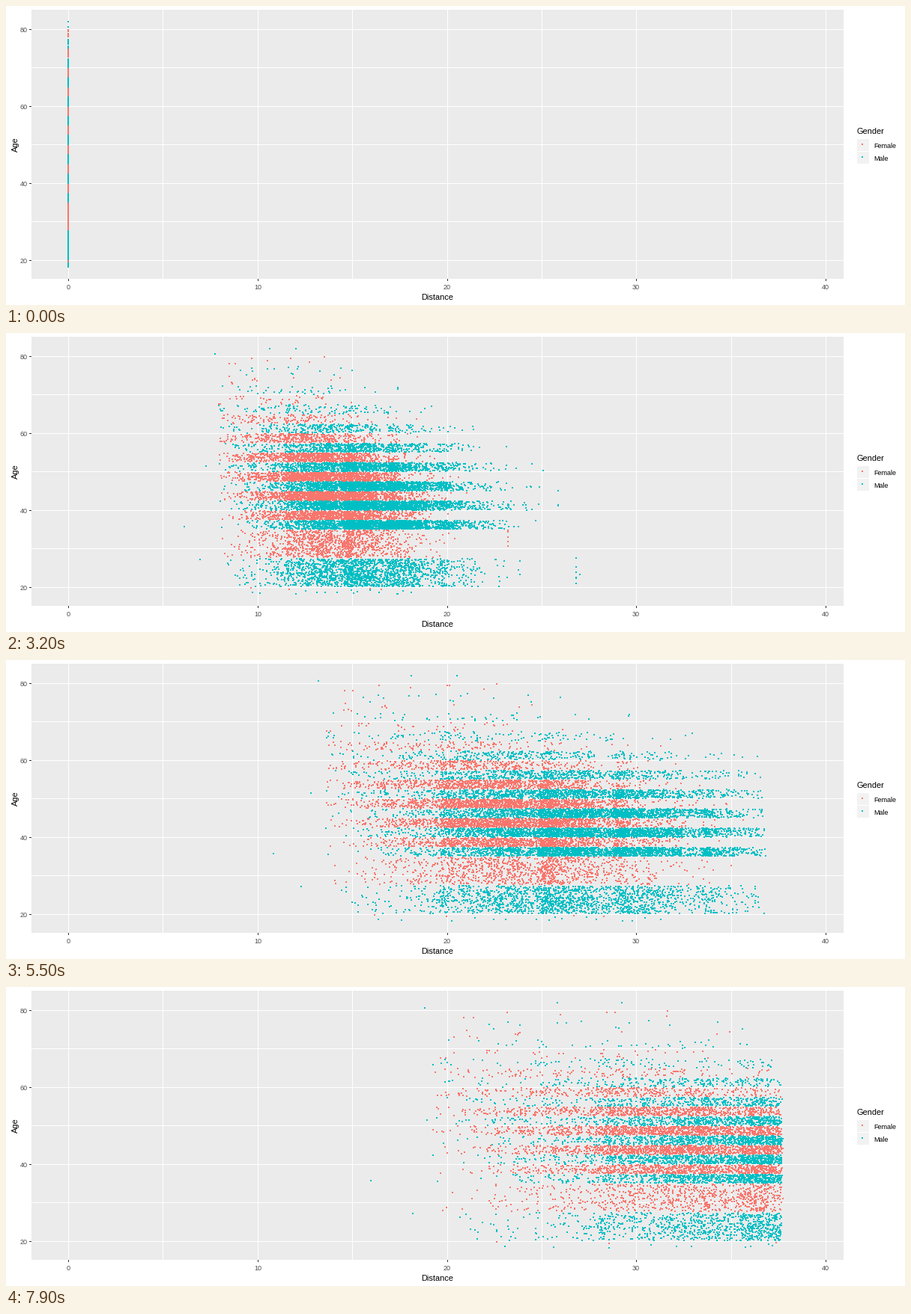
Animation, 1200 px wide and 400 px high, one loop 8000 ms. Source, as a matplotlib script:

```python
import matplotlib.pyplot as plt
import numpy as np
from matplotlib.animation import FuncAnimation
from matplotlib.patches import Rectangle

W, H, DPI = 1200, 400, 100
FRAMES, INTERVAL = 80, 100
FEMALE, MALE = "#F8766D", "#00BFC4"
REF = 48            # step at which each runner's distance is sampled
SPLIT = 5.83        # steps between two timing samples
LIMIT = 38.9        # runners past this at their next sample are dropped
SLOWEST = 11.9
GOALS = (17.2, 21.8, 25.2, 29.2)   # distances matching round target times

rng = np.random.default_rng(26)
plt.rcParams["font.family"] = "Liberation Sans"


def px(distance):
    return 82.9 + 25.28 * distance


def py(age):
    return 443.5 - 5.15 * age


def runners_of(dist, age, fatigue):
    return np.column_stack(np.broadcast_arrays(dist, age, fatigue))


def band(low, height, count, mean, sd):
    """Random runners of one age band."""
    dist = rng.normal(mean, sd, count)
    spare = rng.uniform(SLOWEST, 22, count)
    dist = np.where(dist < SLOWEST, spare, dist)
    # Some runners speed up to finish just inside a round target time.
    for goal in GOALS:
        near = (dist < goal) & (dist > goal - 0.9) & (rng.random(count) < 0.35)
        dist[near] = goal + 0.6 * rng.random(near.sum())
    age = low + 0.15 + (height - 0.2) * rng.random(count)
    return runners_of(dist, age, rng.normal(0.0002, 0.0004, count))


def pack(dist, low, high, count):
    """Leading runners who stay side by side."""
    return runners_of(dist, rng.uniform(low, high, count), 0.0002)


def older_bands(start, peak_age, peak_count, spread, mean, sd):
    """Five-year bands that thin out and slow down with age."""
    for low in np.arange(start, start + 45, 5):
        crowd = peak_count * np.exp(-((low - peak_age) / spread) ** 2)
        slowing = (low - start) ** 2 / 185
        yield band(low, 2.5, int(crowd) + 8, mean - slowing, sd)


def make_men():
    return np.vstack([
        band(18.1, 1.2, 16, 21, 4),
        band(20.1, 7.4, 1900, 23.2, 3.9),
        *older_bands(35, 39, 2300, 15, 24.3, 3.9),
        pack(40, 21, 28, 7),
        pack(38.6, 37, 47, 3),
        runners_of([11.55, 15.84, 17.93], [80.6, 82, 82], 0.0003),
        runners_of([9.37, 10.65, 11.1], [35.9, 27.3, 51.5], -0.0012),
    ])


def make_women():
    return np.vstack([
        band(19.3, 0.6, 4, 20, 3),
        band(27.7, 7.3, 1100, 20.9, 3.1),
        *older_bands(37.5, 44, 1500, 11.7, 20.7, 3.1),
        pack(34.6, 30, 35, 6),
    ])


def distance_at(runners, step):
    time = np.interp(step, [0, 9, 18, 27, 90], [0, 8.9, 17.4, 27.1, 90])
    dist, _, fatigue = runners.T
    return dist * time / REF * (1 - fatigue * (time - REF))


fig = plt.figure(figsize=(W / DPI, H / DPI), dpi=DPI, facecolor="white")
ax = fig.add_axes([0, 0, 1, 1])
ax.set_xlim(0, W)
ax.set_ylim(H, 0)
ax.axis("off")


def box(x, y, w, h, color):
    ax.add_patch(Rectangle((x, y), w, h, facecolor=color, linewidth=0,
                           antialiased=False, zorder=1))


def label(x, y, text, size=9, color="black", **kw):
    ax.text(x, y, text, fontsize=size * 72 / DPI, color=color, **kw)


def dots(color):
    return ax.plot([], [], "s", color=color, markersize=1.45,
                   markeredgewidth=0, antialiased=False, zorder=3)[0]


def draw_axes():
    box(34, 5, 1084, 360, "#EBEBEB")
    for i in range(9):
        x = round(83 + 126.4 * i)
        box(x, 5, 1, 360, "white")
        if i % 2 == 0:
            box(x, 365, 1, 3, "#333333")
            label(x, 379, str(5 * i), color="#4D4D4D", ha="center")
    for i in range(7):
        y = int(340.4 - 51.5 * i)
        box(34, y, 1084, 1, "white")
        if i % 2 == 0:
            box(31, y, 3, 1, "#333333")
            label(29, y + 4, str(20 + 10 * i), color="#4D4D4D", ha="right")
    label(576, 393, "Distance", 11, ha="center")
    label(12.5, 185.5, "Age", 11, rotation=90, ha="center", va="center")


def draw_legend():
    label(1135, 171, "Gender", 11)
    for y, text, color in ((178, "Female", FEMALE), (195, "Male", MALE)):
        box(1136, y, 16, 16, "#F2F2F2")
        dots(color).set_data([1143], [y + 7])
        label(1158, y + 12, text)


draw_axes()
draw_legend()
groups = [(make_women(), dots(FEMALE)), (make_men(), dots(MALE))]


def update(step):
    next_split = SPLIT * np.ceil(step / SPLIT)
    for runners, line in groups:
        racing = runners[distance_at(runners, next_split) <= LIMIT]
        line.set_data(px(distance_at(racing, step)), py(racing[:, 1]))
    return [line for _, line in groups]


anim = FuncAnimation(fig, update, frames=FRAMES, interval=INTERVAL,
                     repeat=True, repeat_delay=0)
plt.show()
```
